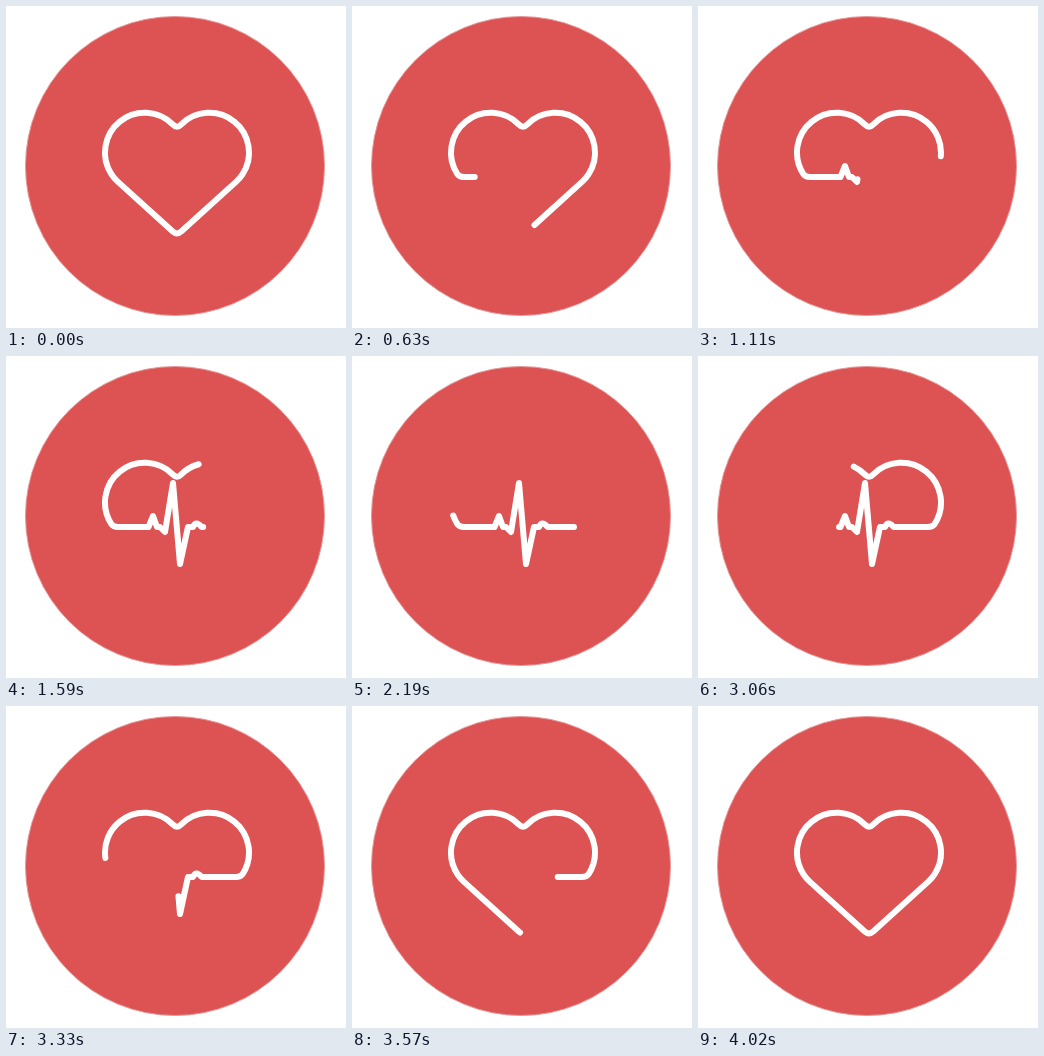
Animation, 340 px wide and 322 px high, one loop 4110 ms. Source, as an HTML page:

```html
<!DOCTYPE html>
<html lang="en">
<head>
<meta charset="utf-8">
<title>Heartbeat</title>
<style>
  html, body { margin: 0; width: 100%; height: 100%; overflow: hidden; background: #fff; }
  svg { display: block; }
  #line { fill: none; stroke: #fff; stroke-width: 6; stroke-linecap: round; stroke-linejoin: round; }
</style>
</head>
<body>
<svg width="340" height="322" viewBox="0 0 340 322">
  <circle cx="169" cy="160" r="149.5" fill="#dd5252" stroke="#e59a9a"/>
  <path id="line"/>
</svg>
<script>
const LOOP = 4110, STEP = 30, START = 300;

// The line runs through heart, pulse and heart again, section by section
const leftSide = 'A39.7 39.7 0 0 0 112 175.9 L166.5 225.3 Q168.8 227.4 171 227.4';
const rightSide = 'Q173.2 227.4 175.5 225.3 L230 175.9 A39.7 39.7 0 0 0 236.48 168.3';
const rightLobe = 'A39.7 39.7 0 0 0 175 118.66 Q171 122.8 167 118.66';
const leftLobe = 'A39.7 39.7 0 0 0 105.52 168.3';
const leadIn = 'Q107.5 171 112 171 H142.5';
const beat = 'L147 160 L151 171 H154 L159 176 L167 127 L174 208 L182 171 H187 Q190 164 195.5 171';
const leadOut = 'H230 Q234.5 171 236.48 168.3';
const sections = [leftSide, rightSide, rightLobe, leftLobe, leadIn, beat, leadOut,
  rightLobe, leftLobe, leftSide, rightSide];

// Distance from the start of the line to each section
const line = document.getElementById('line');
let d = 'M105.52 168.3';
const marks = [0];
for (const section of sections) {
  line.setAttribute('d', d += ' ' + section);
  marks.push(line.getTotalLength());
}

// Each end crosses its sections at a steady pace, taking these times in ms
const tail = { first: 0, durations: [260, 430, 790, 450, 880, 330, 580] };
const head = { first: 4, durations: [720, 550, 1010, 440, 370, 190, 440] };

function position({ first, durations }, time) {
  let distance = marks[first];
  durations.forEach((duration, i) => {
    const progress = Math.min(Math.max(time / duration, 0), 1);
    distance += progress * (marks[first + i + 1] - marks[first + i]);
    time -= duration;
  });
  return distance;
}

function draw(now) {
  const time = now % LOOP;
  const elapsed = time - time % STEP - START;
  const start = position(tail, elapsed);
  line.style.strokeDasharray = `${position(head, elapsed) - start} 3000`;
  line.style.strokeDashoffset = -start;
}

const origin = performance.now();
function tick() {
  draw(performance.now() - origin);
  requestAnimationFrame(tick);
}
tick();
</script>
</body>
</html>
```
